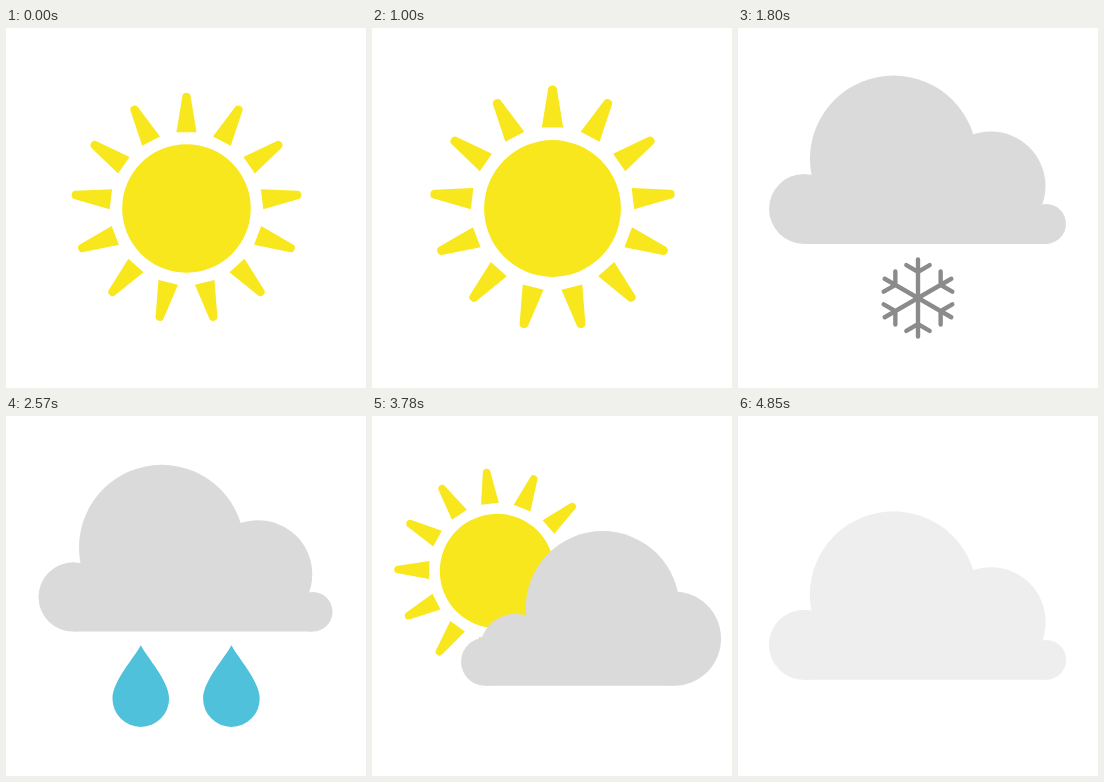
These frames come from a looping animation (360x360 px, 5010 ms). An HTML page:

```html
<!DOCTYPE html>
<html lang="en">
<head>
<meta charset="utf-8">
<title>Weather icons</title>
<style>
  html, body { margin: 0; width: 100%; height: 100%; overflow: hidden; background: #fff; }
  svg { display: block; width: 100%; height: 100%; }
  .scene { display: none; }
</style>
</head>
<body>
<svg viewBox="0 0 360 360">
  <defs>
    <g id="sun" fill="#f8e71c"><circle r="68.4"/></g>
    <g id="cloud">
      <circle cx="65.7" cy="180.9" r="35.1"/>
      <circle cx="155.4" cy="130.9" r="83.8"/>
      <circle cx="253.2" cy="158" r="54.7"/>
      <circle cx="308.4" cy="196" r="20"/>
      <path d="M65.7 180.9H308.4V216H65.7z"/>
    </g>
    <path id="drop" fill="#4fc1db" d="M0-54C6-42 28.7-18 28.7 0A28.7 28.7 0 0 1-28.7 0C-28.7-18-6-42 0-54z"/>
    <g id="flake" fill="none" stroke="#8b8b8b" stroke-width="4.4" stroke-linecap="round"></g>
  </defs>

  <g class="scene"><use href="#sun" x="180.5" y="180.5"/></g>

  <g class="scene">
    <use href="#cloud" fill="#dadada"/>
    <use href="#flake" x="180" y="270.3"/>
  </g>

  <g class="scene">
    <use href="#cloud" fill="#dadada"/>
    <use href="#drop" x="134.2" y="283.9"/>
    <use href="#drop" x="226" y="283.9"/>
  </g>

  <g class="scene">
    <use href="#sun" transform="translate(124.8 155) rotate(-6) scale(.84)"/>
    <g fill="#dadada">
      <circle cx="112.8" cy="246" r="24.1"/>
      <circle cx="143" cy="233" r="35.2"/>
      <circle cx="230.8" cy="192" r="77.2"/>
      <circle cx="302.4" cy="222.8" r="47.3"/>
      <path d="M112.8 233H302.4V270.1H112.8z"/>
    </g>
  </g>

  <g class="scene"><use href="#cloud" y="48" fill="#eee"/></g>
</svg>
<script>
const LOOP = 5010, SCENE = 1002, LAG = 28, START_SCALE = 0.94;
const scenes = [...document.querySelectorAll('.scene')];

// Repeats a path around the origin of a group.
function addRadial(id, count, d) {
  const group = document.getElementById(id);
  for (let i = 0; i < count; i++) {
    const path = document.createElementNS('http://www.w3.org/2000/svg', 'path');
    path.setAttribute('d', d);
    path.setAttribute('transform', `rotate(${360 / count * i})`);
    group.append(path);
  }
}
addRadial('sun', 13, 'M-10.7-81L-4.3-120Q-3.5-123 0-123Q3.5-123 4.3-120L10.7-81z');
addRadial('flake', 6, 'M0 0V-38.6M-11.7-33L0-26.2L11.7-33');

function draw(now) {
  const t = now % LOOP;
  const current = Math.min(scenes.length - 1, Math.floor(Math.max(0, t - LAG) / SCENE));
  const start = current ? current * SCENE + LAG : 0;
  const p = Math.min(1, (t - start) / SCENE);
  const scale = 1 - (1 - START_SCALE) * (1 - p) ** 2;
  scenes.forEach((scene, i) => scene.style.display = i === current ? 'inline' : 'none');
  scenes[current].setAttribute('transform', `translate(180 180) scale(${scale}) translate(-180 -180)`);
}

let origin;
function tick(now) {
  origin ??= now;
  draw(now - origin);
  requestAnimationFrame(tick);
}
draw(0);
requestAnimationFrame(tick);
</script>
</body>
</html>
```
